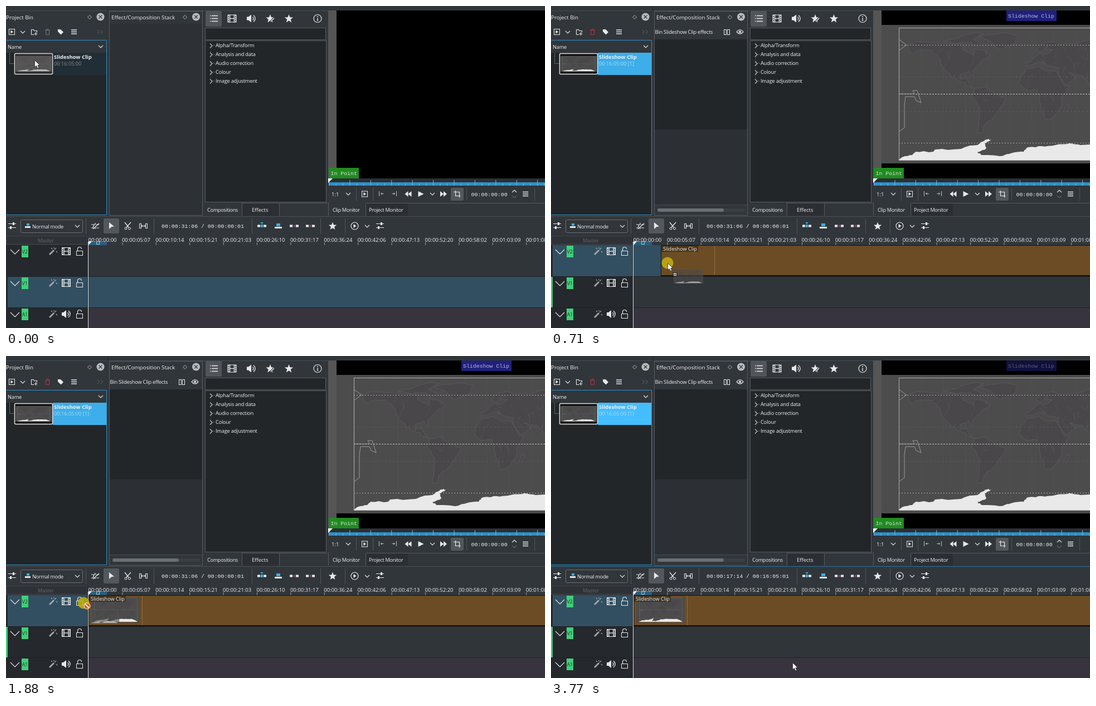
Write an HTML page that moves like this. It is 967 px wide and 579 px high and loops after 3830 ms.

```html
<!DOCTYPE html>
<html lang="en">
<head>
<meta charset="utf-8">
<title>Adding a slideshow clip to the timeline</title>
<style>
html, body { margin: 0; width: 100%; height: 100%; overflow: hidden; background: #31363b; }
svg { display: block; }
text { font-family: "Open Sans", "Noto Sans", sans-serif; fill: #eff0f1; white-space: pre; }
.list { font-size: 9.2px; letter-spacing: -.19px; }
.tab { font-size: 9.2px; letter-spacing: -.34px; }
.title { font-size: 9.8px; }
.time { font-size: 9.5px; }
.mono { font: 9.87px "Liberation Mono", "DejaVu Sans Mono", monospace; }
</style>
</head>
<body>
<svg id="stage" width="967" height="579" viewBox="0 0 967 579"></svg>
<script>
const LOOP = 3830, FG = '#e8e9ea', WIN = '#31363b', VIEW = '#232629', EDGE = '#565b60', BLUE = '#3daee9';
const ACTIVE = '#324f61', TRACK = '#30353a', HEAD = '#25282c';

const rect = (x, y, w, h, fill, more = '') => `<rect x="${x}" y="${y}" width="${w}" height="${h}" fill="${fill}" ${more}/>`;
const frame = (x, y, w, h, stroke, fill = 'none', more = '') => rect(x + .5, y + .5, w - 1, h - 1, fill, `stroke="${stroke}" ${more}`);
const line = (d, stroke = FG, w = 1, more = '') => `<path d="${d}" fill="none" stroke="${stroke}" stroke-width="${w}" ${more}/>`;
const fill = (d, color = FG, more = '') => `<path d="${d}" fill="${color}" ${more}/>`;
const text = (x, y, s, cls = 'list', more = '') => `<text x="${x}" y="${y}" class="${cls}" ${more}>${s}</text>`;
const circle = (x, y, r, color, more = '') => `<circle cx="${x}" cy="${y}" r="${r}" fill="${color}" ${more}/>`;
const group = (id, s, more = '') => `<g id="${id}" ${more}>${s}</g>`;
const at = (x, y, s) => `<g transform="translate(${x} ${y})">${s}</g>`;

let seed = 11;
const rnd = () => (seed = seed * 16807 % 2147483647) / 2147483647;
const points = str => str.split(' ').map(q => q.split(',').map(Number));

// Splits a coarse outline into small jittered pieces.
function rough(p, amp) {
  const out = [];
  p.forEach((a, i) => {
    const b = p[(i + 1) % p.length];
    for (let k = 0; k < 4; k++) {
      const j = k ? amp : 0;
      out.push((a[0] + (b[0] - a[0]) * k / 4 + (rnd() - .5) * j).toFixed(1) + ',' +
               (a[1] + (b[1] - a[1]) * k / 4 + (rnd() - .5) * j).toFixed(1));
    }
  });
  return 'M' + out.join('L') + 'Z';
}

// Longitude and latitude to stage pixels.
const project = ([lon, lat]) => [624 + (lon + 180) * 1.328, 158.5 - lat * 1.328];

function worldMap() {
  const land = [
    '-168,66 -156,71 -130,70 -115,68 -95,68 -94,60 -82,55 -79,52 -78,62 -65,59 -56,52 -65,48 -70,43 -76,36 -81,31 -80,25 -84,30 -97,27 -97,20 -88,21 -83,10 -78,8 -95,16 -106,22 -118,34 -124,41 -124,48 -135,59 -150,60 -164,55',
    '-120,72 -100,76 -80,83 -65,82 -80,74 -62,66 -75,65 -85,70 -105,69',
    '-77,8 -62,10 -50,0 -35,-6 -39,-14 -48,-26 -57,-36 -65,-42 -68,-53 -74,-52 -71,-30 -71,-18 -81,-5',
    '-73,78 -40,83 -20,80 -22,70 -43,60 -52,66 -55,71',
    '-6,35 10,37 20,31 33,31 43,12 51,11 40,-4 40,-16 32,-27 26,-34 18,-34 12,-17 9,0 4,6 -8,4 -17,14 -16,23',
    '-9,37 -9,43 -2,44 5,52 10,55 20,54 28,60 18,61 22,66 12,57 5,60 14,68 28,71 40,67 60,69 75,73 105,77 178,68 140,54 122,40 121,28 108,20 104,9 98,9 91,22 80,10 73,20 67,25 50,29 59,22 45,13 35,28 36,36 22,38 13,45 18,40 10,44 0,40',
    '49,-13 50,-16 47,-25 44,-22',
    '114,-22 130,-12 142,-11 153,-27 147,-38 130,-32 115,-34'
  ].map(s => rough(points(s).map(project), 2.6)).join('');
  const ice = rough(points('624,276 632,271 648,268 654,262 685,262 690,258 735,257 748,252 765,250 774,244 786,239 789,241 778,247 781,256 765,263 775,268 805,270 828,264 848,262 856,254 880,252 905,250 930,247 950,250 1040,249 1070,258 1101,272 1101,277 624,277'), 2.4);
  let borders = '';
  for (let i = 0; i < 90; i++) {
    const x = i % 3 ? 845 + rnd() * 120 : 690 + rnd() * 125, y = 60 + rnd() * 145;
    borders += `M${x} ${y}l${rnd() * 16 - 8} ${rnd() * 8}l${rnd() * 12 - 6} ${rnd() * 12}`;
  }
  let grid = '';
  for (let x = 663.8; x < 1100; x += 39.8) grid += `M${x} 39V277`;
  return rect(593, 34, 538, 249, '#4c4c4c') +
    line(grid, '#555', .7) + fill(land, '#494749', 'stroke="#5c585e" stroke-width=".9"') +
    `<clipPath id="land"><path d="${land}"/></clipPath>` + line(borders, '#59555b', .8, 'clip-path="url(#land)"') +
    line('M624 127.5H1102M624 189.5H1102', '#5a5a5a', 1, 'stroke-dasharray="3 4"') +
    line('M624 70.5H1102M624 246.5H1102', '#aaa', 1, 'stroke-dasharray="2 3"') +
    line('M624 158.5H1102', '#c4c4c4', 1, 'stroke-dasharray="3 2"') + fill(ice, '#e9e9e9') +
    line('M624 60L638 70 624 80M624 158H652L649 152H657L664 174 655 170 652 163H636L634 178V219L624 226', '#999') +
    frame(624, 39, 478, 239, '#b0b0b0');
}
const thumb = (x, y, w, h, box, more = '') =>
  `<svg x="${x}" y="${y}" width="${w}" height="${h}" viewBox="${box}" preserveAspectRatio="none" ${more}><use href="#map"/></svg>`;
const CROP = '593 34 538 249', FULL = '593 8 538 302';

const chev = (x, y, r = 4, c = FG) => line(`M${x - r} ${y - r / 2}l${r} ${r}l${r} ${-r}`, c, 1.1);
const sep = (x, y1, y2) => line(`M${x + .5} ${y1}V${y2}`, '#50555a');
const menu = (x, y) => line(`M${x - 5} ${y - 3.5}h10m-10 3.5h10m-10 3.5h10`, FG, 1.5);
const star = (x, y, r, c = FG) => {
  let d = '';
  for (let i = 0; i < 10; i++) {
    const a = i * Math.PI / 5, q = i % 2 ? r * .42 : r;
    d += (i ? 'L' : 'M') + (x + q * Math.sin(a)).toFixed(2) + ' ' + (y - q * Math.cos(a)).toFixed(2);
  }
  return fill(d + 'Z', c);
};
const film = (x, y) => frame(x - 8, y - 7, 16, 14, FG) + line(`M${x - 4} ${y - 7}v14m8 -14v14`, FG, 1.4) +
  line(`M${x - 4} ${y}h8`, FG, 1.3) + line(`M${x - 6.5} ${y - 6}v12m13 -12v12`, FG, 2, 'stroke-dasharray="2 1.4"');
const speaker = (x, y) => fill(`M${x - 8} ${y - 3}h3l5 -4v14l-5 -4h-3z`) +
  line(`M${x + 2.5} ${y - 3}q3 3 0 6m1.5 -9q6.5 6 0 12`, FG, 1.3);
const lock = (x, y) => frame(x - 6, y - 1, 12, 9, FG) + line(`M${x - 3.5} ${y - 1}v-3q0 -3.5 3.5 -3.5t3.5 3.5`, FG, 1.2);
const wand = (x, y) => line(`M${x - 6} ${y + 6}l8 -8`, '#a6a9ac', 2.6) + line(`M${x + 3} ${y - 3}l3 -3m-9 0l2 2m7 4l2 2m-6 -9v2`, '#a6a9ac', 1.2);
const play = (x, y, s = 1) => `M${x - 5 * s} ${y - 5}l${10 * s} 5l${-10 * s} 5z`;
const sliders = (x, y) => line(`M${x - 7} ${y - 3.5}h14m-14 7h14`, FG, 1.2) + rect(x + 1, y - 6, 3, 5, FG) + rect(x - 4, y + 1, 3, 5, FG);
const clipBox = (x, y) => frame(x - 5, y - 5, 11, 11, FG) + fill(`M${x - 1.5} ${y - 2.5}l4.5 3l-4.5 3z`);
const dock = (x, cx) => line(`M${x} 16.5l3.5 3.5l-3.5 3.5l-3.5 -3.5z`, '#aeb1b4') +
  circle(cx, 19.5, 7, '#b9bcc0') + line(`M${cx - 3} 16.5l6 6m0 -6l-6 6`, WIN, 1.2);

function projectBin() {
  return text(0, 24, 'Project Bin', 'title') + dock(150, 169.5) +
    clipBox(10, 46) + chev(30, 47) +
    line('M45.5 51.5v-9h4l1 2h5v3M45.5 51.5h5M53.5 47v6m-3 -3h6', FG, 1.1) +
    group('trash', line('M70 43.5h9m-6 0v-2h3v2M71.5 43.5v8h6v-8', 'currentColor')) +
    fill('M93 42h5l5 5l-4.5 4.5l-5.5 -5.5z') + menu(122, 46.5) +
    line('M164 43l3.5 3.5l-3.5 3.5m6 -7l3.5 3.5l-3.5 3.5', '#62676c') +
    rect(0, 62, 180, 313, VIEW) + rect(0, 62, 180, 22, WIN) + text(3, 77, 'Name') + chev(170, 73) +
    rect(84, 84, 96, 40, '#222e36', 'id="row"') + line('M6.5 84V103.5H15', '#60656a') +
    frame(15, 85, 69, 38, '#e2e2e2', '#111', 'rx="2" stroke-width="1.5"') + thumb(17, 87, 65, 34, FULL) +
    rect(17, 87, 65, 34, '#666', 'id="haze"') +
    text(86, 95, 'Slideshow Clip', 'time', 'font-weight="700"') + text(86, 107, '', 'list', 'id="length" style="letter-spacing:0"') +
    line('M0 61.5H180.5V375.5H0', '#2f8fc4');
}

function stackPanel() {
  return frame(185, 9, 168, 368, EDGE) + text(189, 24, 'Effect/Composition Stack', 'title') + dock(321, 341) +
    rect(186, 32, 166, 344, '#2d3136', 'id="empty"') +
    group('stack', text(186.5, 50, 'Bin Slideshow Clip effects') +
      frame(310, 42, 5, 10, FG) + frame(316, 42, 5, 10, FG) +
      line('M333 46.5q6 -7.5 12 0q-6 7 -12 0z', FG, 1.2) + circle(339, 46.5, 2, FG) +
      rect(186, 60, 166, 162, VIEW) + rect(186, 222, 166, 135, '#2c3035') +
      line('M186 357.5H352', '#464b50') + rect(191, 364, 157, 6, '#3a3f44', 'rx="3"') + rect(191, 364, 119, 6, '#6b6f73', 'rx="3"'));
}

function effectsPanel() {
  const names = ['Alpha/Transform', 'Analysis and data', 'Audio correction', 'Colour', 'Image adjustment'];
  return rect(358, 9, 29, 28, '#50555a', 'rx="2"') +
    line('M369 17.5h11m-11 5h11m-11 5h11', FG, 1.4) + line('M366 17.5h1.5m-1.5 5h1.5m-1.5 5h1.5', FG, 1.6) +
    film(405.5, 22.5) + speaker(440, 22.5) + star(474, 23, 8) + line('M474 29l7 -8', WIN, 3) + line('M475 28l6 -6', FG, 1.4) +
    star(507.5, 23, 8) + circle(559, 22.5, 7, 'none', `stroke="${FG}" stroke-width="1.2"`) + line('M559 18v2m0 1.5v5.5', FG, 1.4) +
    frame(357, 39, 217, 22, EDGE, VIEW) + frame(357, 62, 218, 291, EDGE, VIEW) +
    line('M367.5 78V132', '#4b5055', 1, 'stroke-dasharray="1 2"') +
    names.map((s, i) => line(`M366 ${67.5 + 16 * i}l4 4l-4 4`, '#c8cacc', 1.1) +
      line(`M371 ${71 + 16 * i}h4`, '#5c6166') + text(376, 74 + 16 * i, s)).join('') +
    rect(357, 353, 67, 24, WIN) + rect(424, 355, 66, 22, '#2b2f33') + line('M423.5 353V377M490.5 355V377M424 354.5H577', EDGE) +
    text(361, 370, 'Compositions', 'tab') + text(441, 370, 'Effects', 'time');
}

function monitor() {
  let ticks = '';
  for (let i = 0, x = 579.5; x < 967; i++, x += 12.47) ticks += `M${x.toFixed(1)} ${i % 3 ? 319 : 313}V323`;
  return rect(578, 8, 15, 302, '#555') + rect(593, 8, 374, 302, '#000') +
    group('picture', '<use href="#map"/>') +
    group('name', rect(817, 8, 90, 19, '#20207c') + text(820, 21, 'Slideshow Clip', 'mono', 'style="fill:#b9b9d8"')) +
    rect(578, 310, 389, 14, '#2b2f33') + rect(579, 317, 388, 6, '#308fc4') + line(ticks, '#7fb6d3') +
    fill('M578 310h8l-8 8z', '#fff') + rect(579, 291, 54, 19, '#228b22') + text(582.5, 304, 'In Point', 'mono', 'style="fill:#cfe6cf"') +
    text(584, 342, '1:1', 'time') + chev(614, 338) + sep(628, 327, 350) + clipBox(643, 337.5) + sep(658, 327, 350) +
    line('M669.5 333v9m8 -4.5h-5m2 -2l-2 2l2 2M700.5 333v9m-8 -4.5h5m-2 -2l2 2l-2 2', '#c0c3c6') +
    fill(play(718.5, 338, -.6) + play(724.5, 338, -.6) + play(744.5, 338) + play(782, 338, .6) + play(788, 338, .6)) + chev(765, 338) +
    rect(798, 327, 23, 23, '#53585d', 'rx="2"') + line('M806.5 332v9.5h9M803 334.5h10.5v10', FG, 1.2) + sep(826, 327, 350) +
    text(834.5, 342, '00:00:00:00', 'mono') + line('M908 335l4 -4l4 4', FG, 1.1) + chev(912, 343, 4, '#62676c') +
    menu(932, 338) + sep(948, 327, 350) +
    rect(645, 355, 76, 22, '#2b2f33') + line('M578.5 353V377M645.5 355V377M646 354.5H967', EDGE) +
    text(586, 370, 'Clip Monitor', 'tab') + text(651, 370, 'Project Monitor', 'tab');
}

function toolbar() {
  const op = (x, c, s) => line(`M${x - 8} 395.5h5m6 0h5`, c, 4) + s;
  return line('M0 378.5H967', '#4a4f54', 1, 'id="focus"') + sliders(11, 395) +
    frame(26, 384, 112, 24, '#686d72', WIN, 'rx="2"') + rect(34, 396, 10, 3, FG) + rect(37, 391, 5, 4, BLUE) +
    text(47, 400, 'Normal mode', 'tab') + chev(128, 396) + sep(143, 382, 410) +
    line('M153 393h5l-2 6h-3m14 -8l-11 10m6 -2h5m-5 -6h5M160 390v4m0 3v4', FG, 1.2) +
    rect(175, 382, 28, 27, '#53585d', 'rx="2"') + fill('M185 389l9 7.5l-4.5 .5l-4.5 4z') +
    line('M213 389l7 9m4 -9l-8 9', FG, 1.3) + circle(215, 400, 2, 'none', `stroke="${FG}"`) + circle(221.5, 400, 2, 'none', `stroke="${FG}"`) +
    frame(239, 391, 4, 9, FG) + frame(250, 391, 4, 9, FG) + line('M243 395.5h7m-7 0l2 -2m-2 2l2 2m5 -2l-2 -2m2 2l-2 2') +
    sep(265, 382, 410) + text(279, 399, '', 'mono', 'id="clock"') + sep(441, 382, 410) +
    op(459, FG, rect(457, 393, 4, 5, BLUE) + fill('M456 389h6l-3 3z', BLUE)) +
    rect(482, 397, 13, 3, FG) + rect(485, 391, 7, 5, BLUE) +
    op(517, FG, line('M515 393.5l4 4m0 -4l-4 4', '#d95a63')) + op(546, FG, line('M544 393.5l4 4m0 -4l-4 4', '#d95a63')) +
    sep(564, 382, 410) + star(586, 396, 7.5) + sep(608, 382, 410) +
    circle(625.5, 395.5, 6.5, 'none', `stroke="${FG}" stroke-width="1.2"`) + fill('M623.5 392l5 3.5l-5 3.5z') +
    chev(648, 396) + sliders(671, 395);
}

const pad = n => String(n).padStart(2, '0');
function code(f) {
  const s = Math.floor(f / 25);
  return [s / 3600, s / 60 % 60, s % 60, f % 25].map(n => pad(Math.floor(n))).join(':');
}

function timeline() {
  let labels = '', ticks = '';
  for (let i = 0; i < 14; i++) {
    labels += text((147.5 + 60.4 * i).toFixed(1), 423.5, code(132 * i), 'time');
    ticks += `M${(148.5 + 60.4 * i).toFixed(1)} 425v5`;
  }
  const head = (y, name, icon) => chev(16, y + 12, 8) + rect(28, y + 1, 12, 21, '#3fcf78') +
    text(28.5, y + 15, name, 'tab', 'style="fill:#1c3a28"') + wand(84, y + 11) + icon(108, y + 11) + lock(132, y + 11);
  return rect(0, 412, 967, 167, '#2b2f33') + rect(146, 412, 821, 18, WIN) + frame(0, 413, 146, 16, '#43484d', '#2e3237') +
    text(57, 425, 'Master', 'list', 'style="fill:#62676c"') +
    rect(0, 430, 967, 56, TRACK, 'id="v2"') + rect(0, 430, 146, 56, HEAD, 'id="v2head"') +
    rect(0, 487, 967, 55, TRACK, 'id="v1"') + rect(0, 487, 146, 55, HEAD, 'id="v1head"') +
    rect(146, 543, 821, 36, '#38343f') + rect(0, 543, 146, 36, HEAD) +
    line('M0 486.5H967M0 542.5H967M146.5 412V579', '#1f2225') + rect(0, 430, 3, 149, HEAD) +
    rect(0, 487, 3, 55, '#3fcf78', 'id="bar"') +
    rect(148, 423, 33, 7, '#2b5d7b') + labels + line(ticks, '#9ea2a5') + frame(162, 423, 6, 6, '#a9c9da') +
    head(430, 'V2', film) + head(487, 'V1', film) + head(543, 'A1', speaker) +
    group('clip', rect(0, 430, 830, 56, '#15120c') + rect(1, 431, 829, 53, '#6b4c24') +
      thumb(5, 434, 87, 45, CROP, 'id="clipThumb"') + line('M96.5 431V484', '#8d7146') +
      rect(1, 431, 66, 11, '#2d210f', 'opacity=".55"') + text(4, 440, 'Slideshow Clip', 'time', 'style="font-size:9.1px"') +
      group('handles', circle(2.5, 431.5, 2, '#5fd3e8') + circle(2, 484, 2, '#9a62c9'))) +
    line('M147.5 424V579', '#e6e6e6') + fill('M148 423h6l-5 6z', '#fff');
}

const arrow = fill('M0 0V12.5L3 9.8L5 14.5L7.3 13.5L5.3 9H9.2Z', '#fff', 'stroke="#222" stroke-width=".8"');
function pointer() {
  return group('ghost', thumb(10.5, 11, 54, 26, CROP), 'opacity=".62"') +
    group('press', circle(0, 0, 10.5, '#c4b20c', 'opacity=".85"')) +
    group('arrow', at(.5, .5, arrow)) +
    group('plus', frame(10, 17, 7, 7, '#111', '#fff') + line('M13.5 18.5v4m-2 -2h4', '#111')) +
    group('no', circle(6.5, 5.5, 5.5, '#d9631e', 'stroke="#fff"') + line('M3 2l7 7', '#fff', 2)) +
    group('hand', fill('M-3 10L-6 3Q-7 0 -4.5 1L-3.5 3V-6Q-2.5 -8 -1.5 -6V-1V-8Q-.5 -9.5 .8 -8V-1V-7Q2 -8.5 3 -7V0V-4.5Q4.5 -6 5.5 -4.5V5L4 10Z',
      '#fff', 'stroke="#111" stroke-width=".7" transform="scale(1.1)"'));
}

const stage = document.getElementById('stage');
stage.innerHTML = `<defs>${group('map', worldMap())}</defs>` + rect(0, 0, 967, 579, WIN) +
  line('M0 8.5H181M185 8.5H967', '#464b50') + line('M182.5 0V8', '#26292c') +
  projectBin() + stackPanel() + effectsPanel() + monitor() + toolbar() + timeline() + group('cursor', pointer());

// time, pointer x, pointer y, pointer kind, clip x
const STEPS = [
  [0, 51, 97, 'arrow'], [100, 51, 98, 'press'], [170, 55, 110, 'press'], [240, 63, 130, 'no'],
  [320, 88, 215, 'no'], [400, 126, 330, 'no'], [480, 166, 420, 'no'], [560, 196, 468, 'copy'],
  [660, 205, 465, 'copy', 197], [710, 209, 462, 'copy', 197], [790, 225, 468, 'copy', 213],
  [1120, 223, 467, 'copy', 213], [1200, 218, 465, 'copy', 211], [1280, 209, 462, 'copy', 206],
  [1350, 196, 458, 'copy', 200], [1420, 182, 454, 'copy', 197], [1480, 168, 450, 'copy', 170],
  [1550, 155, 447, 'copy', 148], [1630, 145, 445, 'no', 148], [1730, 140, 444, 'no', 148],
  [1880, 139, 444, 'no', 148], [2110, 152, 449, 'copy', 148], [2190, 168, 456, 'copy', 148],
  [2270, 184, 462, 'hand', 148], [2350, 195, 465, 'hand', 148], [2500, 198, 466, 'hand', 148],
  [2650, 196, 466, 'hand', 148], [2800, 198, 465, 'hand', 148], [2880, 204, 463, 'hand', 148],
  [2970, 214, 461, 'hand', 148], [3050, 228, 460, 'hand', 148], [3140, 245, 460, 'hand', 148],
  [3220, 267, 462, 'hand', 148], [3310, 293, 466, 'hand', 148], [3360, 318, 471, 'hand', 148],
  [3440, 348, 482, 'hand', 148], [3520, 372, 503, 'arrow', 148], [3600, 397, 524, 'arrow', 148],
  [3680, 418, 541, 'arrow', 148], [3770, 433, 551, 'arrow', 148]
];

const $ = id => document.getElementById(id);
const show = (id, on) => $(id).style.display = on ? '' : 'none';
const paint = (id, c) => $(id).setAttribute('fill', c);
const move = (id, x, y) => $(id).setAttribute('transform', `translate(${x} ${y})`);

function apply([t, x, y, kind, clip]) {
  const picked = t >= 100, loaded = t >= 170, placed = clip !== undefined, dropped = t >= 2270;
  const held = kind === 'no' || kind === 'copy';
  move('cursor', x, y);
  show('ghost', held);
  show('press', held || kind === 'press');
  show('arrow', kind !== 'no' && kind !== 'hand');
  show('plus', kind === 'copy');
  show('no', kind === 'no');
  show('hand', kind === 'hand');

  paint('row', !picked ? '#222e36' : t < 320 || dropped ? '#45bdff' : BLUE);
  $('haze').style.opacity = picked ? 0 : .35;
  $('length').textContent = '00:16:05:00' + (placed ? ' [1]' : '');
  $('length').style.fill = picked ? '#a9dcf8' : '#858a8e';
  $('trash').style.color = picked ? '#b8343f' : '#74797d';
  show('empty', !loaded);
  for (const id of ['stack', 'picture', 'name', 'bar']) show(id, loaded);

  paint('v2', placed ? ACTIVE : TRACK);
  paint('v2head', placed ? ACTIVE : HEAD);
  paint('v1', placed ? TRACK : ACTIVE);
  paint('v1head', placed ? HEAD : ACTIVE);
  show('clip', placed);
  if (placed) move('clip', clip, 0);
  show('clipThumb', t >= 790);
  show('handles', kind === 'hand');
  $('focus').setAttribute('stroke', dropped ? '#2d7299' : '#4a4f54');
  const spot = Math.round((Math.min(x, 348) - 147.2) * 132 / 60.4);
  $('clock').textContent = dropped ? code(spot) + ' / 00:16:05:01' : '00:00:31:06 / 00:00:00:01';
  $('name').style.opacity = 1 - .5 * Math.max(0, (t - 2900) / 870);
}

let shown;
function tick() {
  const t = performance.now() % LOOP;
  const step = STEPS.findLast(s => s[0] <= t);
  if (step !== shown) apply(shown = step);
  requestAnimationFrame(tick);
}
tick();
</script>
</body>
</html>
```
